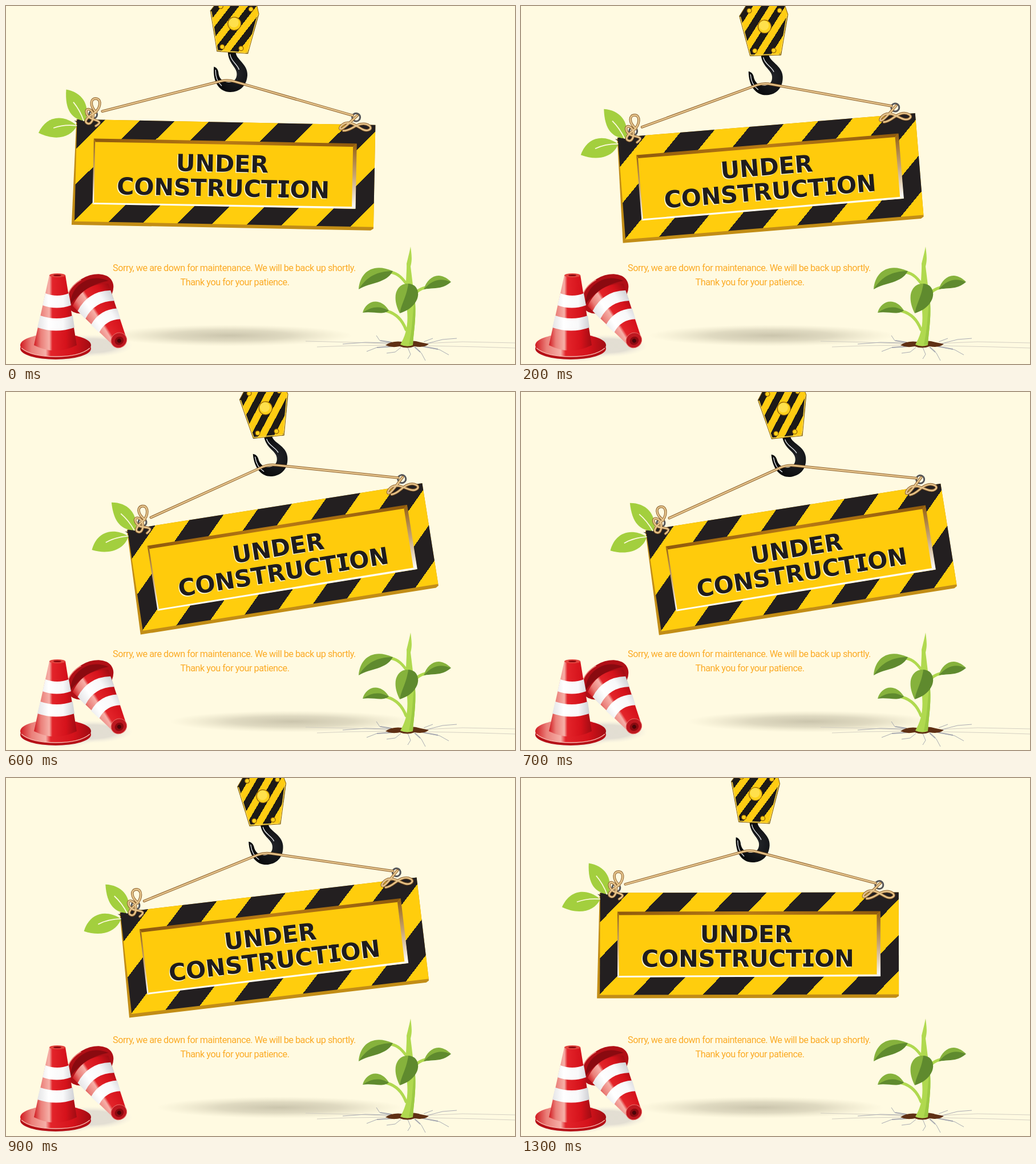
Recreate the animation shown at these times as an HTML page. Size 892 by 628 pixels, loop 1400 ms.

```html
<!DOCTYPE html>
<html lang="en">
<head>
<meta charset="utf-8">
<title>Under construction</title>
<style>
  html, body { margin: 0; width: 100%; height: 100%; overflow: hidden; background: #fffae1; }
  svg { display: block; }
  .note { font: 16px Roboto, 'Open Sans', sans-serif; font-stretch: 75%; font-variation-settings: 'wdth' 75; letter-spacing: -.03em; fill: #fbab26; text-anchor: middle; }
  .words { font: bold 41.2px 'DejaVu Sans', sans-serif; }
  .bolt { fill: #ffd21c; stroke: #8a5a08; stroke-width: 1.2; }
  .cord, .core { fill: none; stroke-linecap: round; stroke-linejoin: round; }
  .cord { stroke: #8f6430; stroke-width: 4.6; }
  .core { stroke: #e6c48c; stroke-width: 2.6; }
  .light { fill: #86b23c; }
  .dark { fill: #5f8a2e; }
  .stem { fill: none; stroke: #b0d94f; stroke-linecap: round; }
</style>
</head>
<body>
<svg width="892" height="628" viewBox="0 0 892 628">
  <defs>
    <linearGradient id="hazard" gradientUnits="userSpaceOnUse" x1="247" y1="203" x2="309.75" y2="263.6" spreadMethod="repeat">
      <stop offset=".5" stop-color="#231f20"/><stop offset=".5" stop-color="#ffcd0d"/>
    </linearGradient>
    <linearGradient id="blockStripes" gradientUnits="userSpaceOnUse" x1="400" y1="0" x2="419.2" y2="14.4" spreadMethod="repeat">
      <stop offset=".5" stop-color="#1d1a17"/><stop offset=".5" stop-color="#ffcc12"/>
    </linearGradient>
    <linearGradient id="bevel" x2="0" y2="1">
      <stop stop-color="#95600f"/><stop offset=".5" stop-color="#c7a573"/><stop offset="1" stop-color="#fff"/>
    </linearGradient>
    <linearGradient id="topBevel">
      <stop stop-color="#8f5a0d"/><stop offset=".5" stop-color="#b97b14"/><stop offset="1" stop-color="#8f5a0d"/>
    </linearGradient>
    <linearGradient id="red">
      <stop stop-color="#d11a20"/><stop offset=".16" stop-color="#ea7f79"/><stop offset=".36" stop-color="#f6b0a8"/>
      <stop offset=".43" stop-color="#e3242a"/><stop offset=".75" stop-color="#d5121b"/><stop offset="1" stop-color="#a00c13"/>
    </linearGradient>
    <linearGradient id="white">
      <stop stop-color="#e4e4e6"/><stop offset=".3" stop-color="#fff"/><stop offset=".7" stop-color="#f8f8f9"/><stop offset="1" stop-color="#cfd0d4"/>
    </linearGradient>
    <radialGradient id="shade">
      <stop stop-color="#8d866f" stop-opacity=".46"/><stop offset=".5" stop-color="#9c957d" stop-opacity=".32"/>
      <stop offset="1" stop-color="#c0b898" stop-opacity="0"/>
    </radialGradient>
    <radialGradient id="grey">
      <stop offset=".6" stop-color="#c6c2c4" stop-opacity=".5"/><stop offset="1" stop-color="#e6e2de" stop-opacity="0"/>
    </radialGradient>
    <radialGradient id="iron" cx=".7" cy=".55" r=".6">
      <stop stop-color="#222428"/><stop offset="1" stop-color="#08090b"/>
    </radialGradient>
    <g id="words" class="words">
      <text x="395" y="288" text-anchor="middle">UNDER</text>
      <text x="211" y="331">CONSTRUCT<tspan dx="3.5">I</tspan><tspan dx="3.5">ON</tspan></text>
      <path d="M494.500 301h18v5.500h-18zM494.500 325.500h18v5.500h-18z"/>
    </g>
    <path id="ropes" d="M183 186L390 129Q402 126 414 129.500L622 185"/>
    <path id="leftKnot" d="M172 188C160 176 162 163 172 164S180 182 168 190S150 205 158 208S172 190 162 184S152 196 166 200S182 206 172 212"/>
    <path id="rightKnot" d="M630 185C622 192 608 208 602 209S604 197 616 198S640 214 650 210S648 197 636 200S618 212 606 212"/>
  </defs>

  <ellipse id="shadow" cy="578" rx="216" ry="19" fill="url(#shade)"/>

  <!-- ground and plant -->
  <g fill="none" stroke="#a9abb2" stroke-width="1">
    <path stroke="#d3cfc2" d="M525 588L610 590L680 593M545 598L600 596L680 595M730 592L800 589L892 591M740 596L830 598L892 600"/>
    <path d="M676 590L655 587L649 578M674 591L630 590L590 593M680 597L650 599L632 606M692 599L682 607L667 609M704 599L709 611L704 619M716 598L728 609L735 622M730 597L760 603L776 612M738 592L765 585L790 583M732 589L748 583"/>
    <path stroke-width="2" d="M680 597L650 599M716 598L726 607M730 597L757 602M676 590L656 587"/>
  </g>
  <path fill="#5f3014" d="M665 595Q676 587 694 589Q712 585 727 590L741 593Q733 600 716 597Q703 602 690 597Q676 600 665 595Z"/>
  <path class="stem" stroke-width="5" d="M707 494C695 478 688 469 674 467M711 515C716 502 725 496 735 494M701 568C694 549 682 539 667 535"/>
  <path fill="#b0d94f" d="M691 594C701 577 705 560 703 535C698 500 703 465 702 452C705 440 707 432 709 422C711 438 712 445 709 457C712 480 714 500 717 520C719 550 714 574 713 595Q702 599 691 594Z"/>
  <path fill="#9dca43" d="M706 594C715 555 712 520 717 520C719 550 714 574 713 595Z"/>
  <path class="light" d="M618 497C620 468 642 449 678 465C650 468 632 478 618 497Z"/>
  <path class="dark" d="M618 497C632 475 650 465 678 465C666 487 640 484 618 497Z"/>
  <path class="light" d="M732 497C739 475 759 463 780 484C762 479 748 482 732 497Z"/>
  <path class="dark" d="M732 497C748 479 762 477 780 484C764 498 750 494 732 497Z"/>
  <path class="light" d="M625 538C631 516 656 510 671 534C656 527 642 529 625 538Z"/>
  <path class="dark" d="M625 538C642 526 656 526 671 534C661 543 643 535 625 538Z"/>
  <path class="light" d="M705 487C686 486 674 508 690 539C695 523 704 510 705 487Z"/>
  <path class="dark" d="M705 487C730 488 730 527 690 539C693 522 702 510 705 487Z"/>

  <!-- lying cone -->
  <ellipse cx="150" cy="596" rx="72" ry="20" fill="url(#grey)"/>
  <g transform="translate(147 505) rotate(-32)">
    <ellipse rx="45" ry="30" fill="#b00f16"/>
    <path fill="none" stroke="#f08a80" stroke-width="1.500" d="M-42 -8Q-30 -30 0 -29"/>
    <path fill="#8a0a10" d="M-40 -2Q-24 -24 0 -24T40 -2Q0 -18 -40 -2Z"/>
    <path fill="url(#red)" d="M-37 2Q0 -22 37 2L14 96H-14Z"/>
    <path fill="url(#white)" d="M-34 14Q0 -6 34 14L30 33Q0 15 -30 33ZM-27 47Q0 32 27 47L22 66Q0 53 -22 66Z"/>
    <ellipse cy="96" rx="14" ry="13" fill="#bd1820" stroke="#e9706a"/>
    <ellipse cy="97" rx="8" ry="7" fill="#8c0a10"/>
    <circle cy="97" r="3.500" fill="#4c0508"/>
  </g>

  <!-- standing cone -->
  <ellipse cx="92" cy="604" rx="70" ry="21" fill="url(#grey)"/>
  <ellipse cx="87" cy="601" rx="62" ry="19" fill="#b50f16"/>
  <ellipse cx="87" cy="595" rx="62" ry="20" fill="url(#red)"/>
  <path fill="none" stroke="#f7b4aa" stroke-width="1.500" d="M27 600Q44 615 87 615T147 600"/>
  <path fill="url(#red)" d="M76 472L49 595Q86 614 124 595L104 472Z"/>
  <path fill="url(#white)" d="M69 504Q90 512 110 504L114 525Q89 534 64 525ZM60 543Q89 553 117 543L120 564Q88 575 55 564Z"/>
  <ellipse cx="90" cy="472.500" rx="14" ry="3.500" fill="#e2453f"/>
  <ellipse cx="90" cy="472.500" rx="7" ry="1.600" fill="#8c0a10"/>

  <text id="line" class="note" x="400" y="464.500">Sorry, we are down for maintenance. We will be back up shortly.</text>
  <text class="note" x="401" y="489.500">Thank you for your patience.</text>

  <g id="rig">
    <!-- hook and pulley block -->
    <g transform="translate(2)">
      <path fill="url(#iron)" d="M399 77L413 77C412 90 435 98 434 118C433 137 421 148 404 148C387 148 373 133 375 104C379 105 382 108 383 113C384 125 391 131 402 131C412 131 417 122 415 113C413 103 400 97 399 77Z"/>
      <path fill="none" stroke="#dfe2e6" stroke-width="1.400" stroke-linecap="round" d="M403 82C404 93 416 99 419 108M378 110C378 122 382 131 389 137"/>
      <path fill="url(#blockStripes)" stroke="#8a6410" d="M382 -14L447 -10L452 10L434 80L380 77L367 6Z"/>
      <path fill="none" stroke="#ffd84a" stroke-width="1.500" d="M368.500 7L381 75.500L433 78.500L450.500 10"/>
      <circle class="bolt" cx="409.500" cy="28" r="11.500"/>
      <circle cx="408.500" cy="26" r="8.500" fill="#ffe04c"/>
      <g class="bolt"><circle cx="385" cy="-2" r="4"/><circle cx="438" cy="2" r="4"/><circle cx="389" cy="69" r="4"/><circle cx="422" cy="71" r="4"/></g>
    </g>

    <!-- board -->
    <path fill="#c28d16" d="M138 201H662V383L657 386H133Z"/>
    <path fill="url(#hazard)" d="M139 201H662V380H138Z"/>
    <path fill="#ffcb0c" d="M170 235H629.500V348.500H170Z"/>
    <path fill="url(#topBevel)" d="M169 234H630L623.500 240H172Z"/>
    <path fill="url(#bevel)" d="M630 234V348.500L623.500 345V240Z"/>
    <path fill="url(#bevel)" d="M169 234L171.500 240V346L169 349.500Z"/>
    <path fill="#fffdf0" d="M169 349.500L172 346.500L623.500 345L630 348.500Z"/>
    <use href="#words" x="-1.600" y="1.400" fill="#fff6cf"/>
    <use href="#words" fill="#1f1c1d"/>

    <!-- leaves -->
    <path fill="#231f20" d="M134 203L147 207L142 199L155 203L161 197L168 208L160 219L152 214L140 222L144 213L133 214L142 209Z"/>
    <path fill="#a3cf3e" d="M119 149C146 153 162 174 154 204C130 201 117 186 119 149Z"/>
    <path fill="#a3cf3e" d="M72 226C84 198 112 190 139 212C129 234 101 240 72 226Z"/>
    <path fill="none" stroke="#fdf9df" stroke-width="1.800" d="M132 171Q144 185 151 204M98 217Q116 210 139 212"/>

    <!-- rope -->
    <g fill="none" stroke="#55565a" stroke-width="3"><circle cx="167" cy="192" r="7"/><circle cx="628" cy="188" r="7"/></g>
    <use href="#ropes" class="cord"/><use href="#ropes" class="core"/>
    <use href="#leftKnot" class="cord"/><use href="#leftKnot" class="core"/>
    <use href="#rightKnot" class="cord"/><use href="#rightKnot" class="core"/>
  </g>
</svg>
<script>
const LOOP = 1400, STEP = 100;
const $ = id => document.getElementById(id);

// time, board centre x, y, tilt in degrees, shadow centre x
const keys = [
  [0, 383.2, 294, 1.1, 392],
  [200, 436.5, 299.5, -4.7, 440],
  [400, 457.2, 297.7, -6.9, 440],
  [600, 484.2, 290.2, -9, 502],
  [800, 486.7, 293.2, -8.3, 498],
  [1100, 425.7, 297, -3, 435],
  [1300, 399.5, 291.2, -0.1, 420]
];

function key(i) {
  const n = keys.length, turn = Math.floor(i / n);
  const [t, ...pose] = keys[i - turn * n];
  return [t + turn * LOOP, ...pose];
}

// smooth cyclic curve through the keys
function poseAt(t) {
  const i = keys.findLastIndex(k => k[0] <= t);
  const [p, a, b, n] = [-1, 0, 1, 2].map(d => key(i + d));
  const h = b[0] - a[0], u = (t - a[0]) / h, v = 1 - u;
  return [1, 2, 3, 4].map(c => {
    const ma = (b[c] - p[c]) / (b[0] - p[0]) * h;
    const mb = (n[c] - a[c]) / (n[0] - a[0]) * h;
    return v * v * (1 + 2 * u) * a[c] + u * u * (1 + 2 * v) * b[c] + u * v * (v * ma - u * mb);
  });
}

function draw(now) {
  const [x, y, tilt, shade] = poseAt(Math.floor(now % LOOP / STEP) * STEP);
  $('rig').setAttribute('transform', `translate(${x} ${y}) rotate(${tilt}) translate(-399.5 -291.2)`);
  $('shadow').setAttribute('cx', shade);
  requestAnimationFrame(draw);
}

// pick the type size that gives the first line its measure
const size = 16 * 426 / $('line').getComputedTextLength();
document.querySelectorAll('.note').forEach(el => el.style.fontSize = size + 'px');
draw(performance.now());
</script>
</body>
</html>
```
